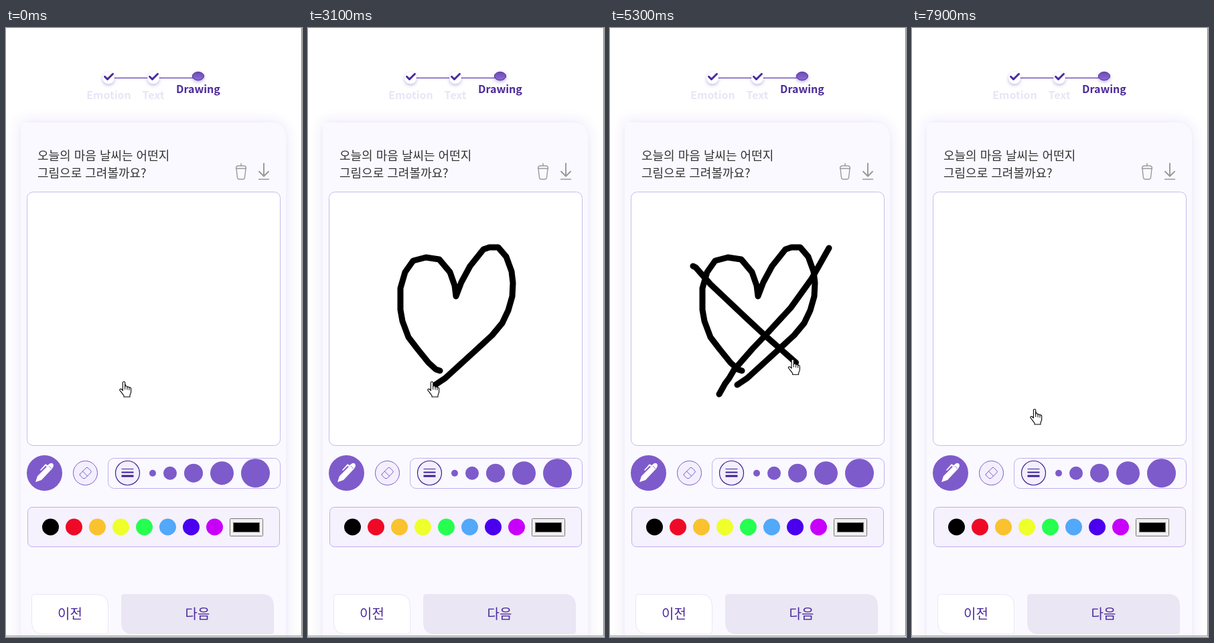
Recreate the animation shown at these times as an HTML page. Size 442 by 908 pixels, loop 8000 ms.

```html
<!DOCTYPE html>
<html lang="ko">
<head>
<meta charset="utf-8">
<title>Drawing</title>
<style>
html, body { margin: 0; width: 100%; height: 100%; overflow: hidden; background: #fff; }
svg { display: block; width: 442px; height: 908px; }
text { font-family: "Noto Sans CJK KR", "Noto Sans CJK", "Noto Sans", sans-serif; }
.step { font-size: 16px; font-weight: 700; text-anchor: middle; }
.ask { font-size: 18px; font-weight: 300; fill: #333; }
.nav { font-size: 20px; font-weight: 500; fill: #4b2a9b; text-anchor: middle; }
.tip { font-size: 15px; fill: #111; text-anchor: middle; }
.line { fill: none; stroke-linecap: round; stroke-linejoin: round; }
</style>
</head>
<body>
<svg viewBox="0 0 442 908">
  <defs>
    <filter id="glow" x="-20%" y="-20%" width="140%" height="140%">
      <feDropShadow dx="0" dy="0" stdDeviation="9" flood-color="#6a4fd0" flood-opacity=".17"/>
    </filter>
    <filter id="soft" x="-80%" y="-80%" width="260%" height="260%">
      <feDropShadow dx="0" dy="2" stdDeviation="2.5" flood-color="#5a3cb4" flood-opacity=".4"/>
    </filter>
    <linearGradient id="dot" x2="0" y2="1">
      <stop stop-color="#6d4bb8"/><stop offset="1" stop-color="#8c6bd0"/>
    </linearGradient>
  </defs>

  <!-- steps -->
  <path d="M153 74.5H287" stroke="#6f55b8" stroke-width="1.6"/>
  <g filter="url(#soft)" fill="#fff">
    <circle cx="153" cy="74.5" r="8.8"/><circle cx="220" cy="74.5" r="8.8"/>
  </g>
  <path class="line" d="M147.500 72.500l4 4 8-8M214.500 72.500l4 4 8-8" stroke="#4a2a9c" stroke-width="3"/>
  <ellipse cx="287" cy="71.800" rx="8.600" ry="6.200" fill="url(#dot)" stroke="#4b2a9b" filter="url(#soft)"/>
  <g class="step">
    <text x="153.500" y="106" fill="#e9e5f6">Emotion</text>
    <text x="220" y="106" fill="#e9e5f6">Text</text>
    <text x="287" y="97" fill="#4b2a9b">Drawing</text>
  </g>

  <!-- card -->
  <path d="M22 920V145q0-4 4-4H394q24 0 24 24V920z" fill="#faf9ff" filter="url(#glow)"/>
  <text class="ask" x="47" y="196.500">오늘의 마음 날씨는 어떤지</text>
  <text class="ask" x="47" y="222.500">그림으로 그려볼까요?</text>
  <g class="line" stroke="#999" stroke-width="1.400">
    <path d="M351 202v3M343.500 209.500q0-4 3.500-4h8q3.500 0 3.500 4zM344 210l1.500 13q.3 2.500 2.800 2.500h5.400q2.500 0 2.800-2.500l1.500-13"/>
    <path d="M385 202v19M378 214l7 7 7-7" stroke-width="1.900"/>
    <path d="M377.500 225.500h15"/>
  </g>
  <rect x="31.500" y="244.500" width="378" height="378" rx="9" fill="#fff" stroke="#c5bdec"/>

  <!-- tools -->
  <circle cx="57.500" cy="663.500" r="26.500" fill="#7e5bca"/>
  <path d="M44 677l3-9 14-14-2-1-7 7-1-1 8-9 3 2 4-3q5-1 5 4l-2 4-16 17z" fill="#fff"/>
  <path d="M64 653l4 4" stroke="#7e5bca" stroke-width=".8"/>
  <g fill="#f3effd" stroke="#7e5bca">
    <circle cx="118.500" cy="663.500" r="18"/>
    <path class="line" d="M110.500 665l9-9q1.500-1.500 3 0l4 4q1.500 1.500 0 3l-8.500 8.500h-3l-4.500-4.500q-1-1 0-2zM114.500 661l7 7"/>
  </g>
  <rect x="152.500" y="641.500" width="257" height="45" rx="9" fill="#faf9ff" stroke="#c0b0ee"/>
  <circle cx="181.500" cy="663.500" r="18" fill="#f3effd" stroke="#3d1f95" stroke-width="1.200"/>
  <g stroke="#3d1f95">
    <path d="M172.500 657.500h18"/><path d="M172.500 662.500h18" stroke-width="2"/><path d="M172.500 668h18" stroke-width="3"/>
  </g>
  <g id="sizes" fill="#7e5bca"></g>

  <!-- palette -->
  <rect x="32.500" y="714.500" width="376" height="59" rx="7" fill="#f5f1fd" stroke="#c0b0ee"/>
  <g id="colors"></g>
  <rect x="334.500" y="731.500" width="49" height="26" rx="1" fill="#efefef" stroke="#777"/>
  <rect x="339.500" y="737.500" width="39" height="14" stroke="#777"/>

  <!-- navigation -->
  <path d="M43.500 844.500h92q17 0 17 17v37q0 5-5 5h-92q-17 0-17-17v-37q0-5 5-5z" fill="#fff" stroke="#e9e6f5"/>
  <path d="M177 844h205q18 0 18 18v37q0 5-5 5h-205q-18 0-18-18v-37q0-5 5-5z" fill="#eae6f4"/>
  <text class="nav" x="95.500" y="881">이전</text>
  <text class="nav" x="286" y="881">다음</text>

  <g id="ink" class="line" stroke="#000" stroke-width="9"></g>
  <g id="tip">
    <rect x="-40" y="171" width="80" height="30" rx="15" fill="#f7a509"/>
    <text class="tip" y="191.300"></text>
  </g>
  <g id="hand">
    <path d="M-1.600 1.700C-1.600-.2 1.700-.2 1.700 1.700V8C2-.0 2 6.800 3.300 6.800 4.800 6.800 5 7.600 5 8.600 5.300 7.500 8 7.700 8 9.300 8.500 8.300 10.700 8.800 10.700 10.600V15.500C10.700 18 9 19 9 21V23H0V21C-2 18.800-3.500 16-6 13.300-7.200 11.600-4.700 10.300-3 12L-1.600 13.500z" fill="#fff" stroke="#000" stroke-width="1.100" stroke-linejoin="round"/>
    <path d="M1.700 7v5M5 8.500V12.500M8 9.300V13" stroke="#000"/>
  </g>
  <path d="M441.500 0V906.500H0" fill="none" stroke="#858585"/>
</svg>
<script>
const LOOP = 8000, STEP = 100, CLEAR = 7400;
const NS = "http://www.w3.org/2000/svg";
const $ = id => document.getElementById(id);

function add(parent, tag, attrs) {
  const el = document.createElementNS(NS, tag);
  for (const k in attrs) el.setAttribute(k, attrs[k]);
  return parent.appendChild(el);
}

[[219, 5], [245, 10], [280, 14], [322.5, 17.5], [372.5, 21.5]].forEach(([cx, r]) =>
  add($("sizes"), "circle", { cx, cy: 663.7, r }));

["#000", "#ee0a26", "#f9c22e", "#eeff2b", "#25ff4f", "#52a8f9", "#4a00ee", "#c800fa"].forEach((fill, i) =>
  add($("colors"), "circle", { cx: 66.5 + 35 * i, cy: 744, r: 12.5, fill }));

const strokes = [
  { from: 800, to: 3100, d: "M197 511L191 509 180 499 163 478 150 461 141 437 138 420 138 388 145 364 157 347 176 342 196 345 212 364 219 384 221 400 229 379 242 355 262 330 271 327 284 327 296 341 304 363 306 380 305 400 299 421 290 440 275 458 250 481 205 522 190 532" },
  { from: 3600, to: 4300, d: "M327 328L301 374 270 417 235 455 213 478 185 510 178 522 172 530 163 546" },
  { from: 4800, to: 5400, d: "M124 355L128 357 150 382 203 432 231 458 279 500 306 530" }
].map(s => {
  const el = add($("ink"), "path", { d: s.d });
  return { ...s, el, len: el.getTotalLength() };
});

// Fingertip positions between strokes: time, x, y
const moves = [
  [0, 176, 527], [800, 192, 506], [3100, 185, 527], [3600, 322, 323],
  [4300, 158, 541], [4600, 111, 405], [4800, 119, 350], [5400, 301, 525],
  [5900, 347, 218], [6300, 347, 218], [6600, 387, 214], [6900, 387, 214],
  [7200, 347, 218], [7500, 347, 218], [7900, 183, 568], [8000, 183, 568]
];

// Start, end, centre x, label
const tips = [
  [5800, 6400, 351, "초기화"], [6500, 7000, 385, "다운로드"], [7100, 7600, 351, "초기화"]
];

function fingertip(t) {
  const s = strokes.find(s => t >= s.from && t <= s.to);
  if (s) {
    const p = s.el.getPointAtLength(s.len * (t - s.from) / (s.to - s.from));
    return [p.x - 5, p.y - 5];
  }
  const i = moves.findIndex(m => m[0] > t);
  const [t0, x0, y0] = moves[i - 1], [t1, x1, y1] = moves[i];
  const k = (t - t0) / (t1 - t0);
  return [x0 + (x1 - x0) * k, y0 + (y1 - y0) * k];
}

function render(t) {
  for (const s of strokes) {
    const done = s.len * Math.min(1, (t - s.from) / (s.to - s.from));
    s.el.style.display = t >= s.from && t < CLEAR ? "" : "none";
    s.el.setAttribute("stroke-dasharray", `${Math.max(done, 0.01)} ${s.len + 20}`);
  }
  const tip = tips.find(([a, b]) => t >= a && t < b);
  $("tip").style.display = tip ? "" : "none";
  if (tip) {
    $("tip").setAttribute("transform", `translate(${tip[2]} 0)`);
    $("tip").querySelector("text").textContent = tip[3];
  }
  $("hand").setAttribute("transform", `translate(${fingertip(t)})`);
}

const start = performance.now();
function tick() {
  const t = (performance.now() - start) % LOOP;
  render(Math.floor(t / STEP) * STEP);
  requestAnimationFrame(tick);
}
tick();
</script>
</body>
</html>
```
